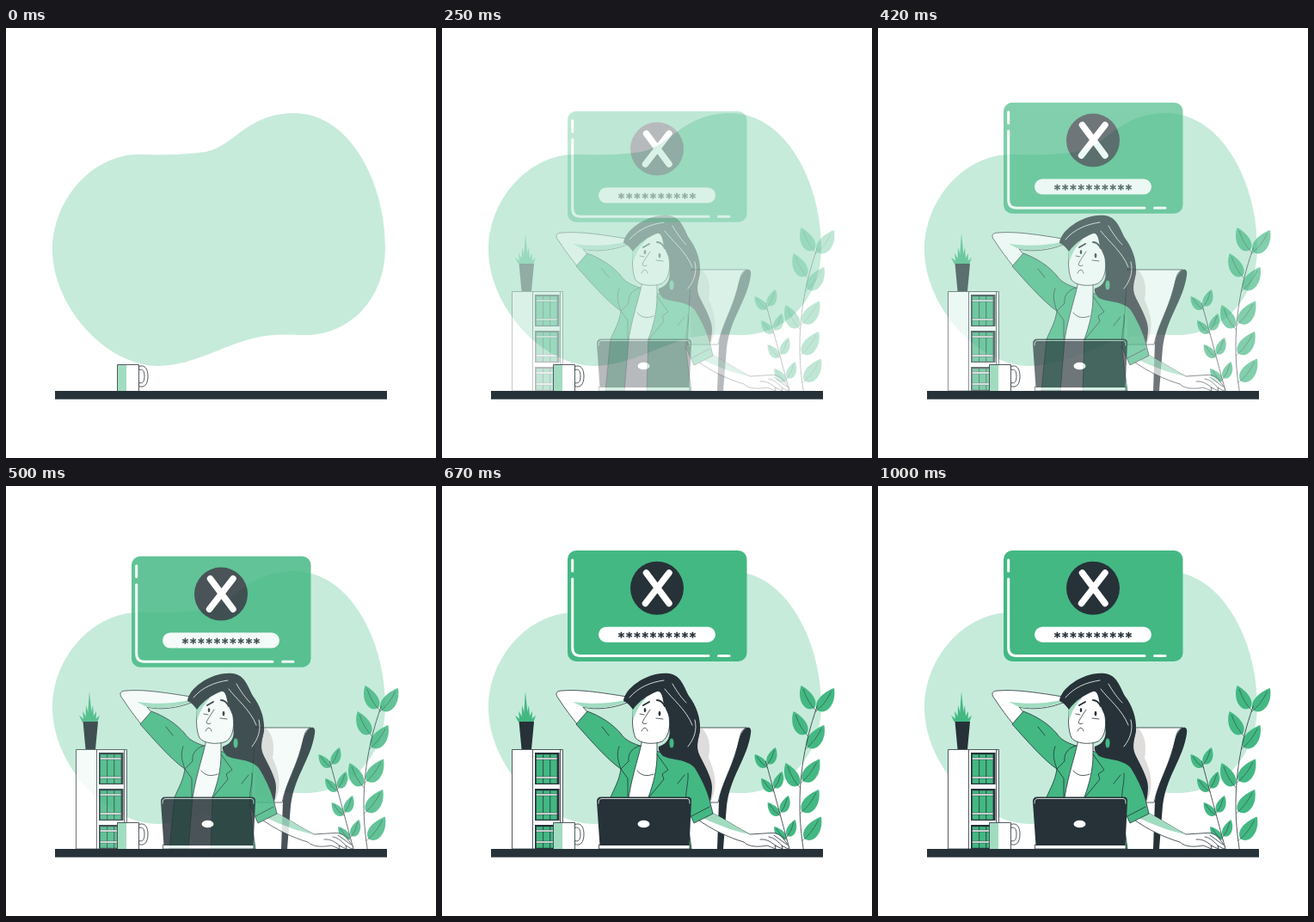
Animation, 500 px wide and 500 px high, one loop 1040 ms. Source, as an HTML page:

```html
<!DOCTYPE html>
<html lang="en">
<head>
<meta charset="utf-8">
<title>Wrong password</title>
<style>
  html, body { margin: 0; width: 100%; height: 100%; overflow: hidden; background: #fff; }
  svg { display: block; width: 100vw; height: 100vh; }
  .dark { fill: #263238; }
  .green { fill: #43b883; }
  .pale { fill: #a1dcc1; }
  .white { fill: #fff; }
  .out { stroke: #263238; stroke-width: .8; stroke-linejoin: round; }
  .line { fill: none; stroke: #263238; stroke-width: .8; stroke-linecap: round; stroke-linejoin: round; }
  .brow { stroke-width: 2; }
  .thin { stroke-width: .5; }
  .shine { fill: none; stroke: #fff; stroke-width: .8; stroke-linecap: round; }
  .stars { font: bold 14px "DejaVu Sans Mono", monospace; letter-spacing: .8px; stroke: #263238; stroke-width: .4; }
</style>
</head>
<body>
<svg viewBox="0 0 500 500">
  <path fill="#c6ebdb" d="M155 147C185 148 212 147 232 144C265 138 280 99 335 99C400 99 441 180 441 255C441 315 400 357 348 357C332 357 320 355 295 359C255 367 220 392 178 393C115 393 54 322 54 258C54 200 100 147 155 147Z"/>

  <g class="fade" id="plants"></g>

  <g class="fade" id="chair">
    <path class="white out" d="M290 281H354C346 284 347 293 343 305C336 330 326 345 321 368H285Z"/>
    <path fill="#dedddb" d="M288 282H303C312 292 312 305 310 316C316 330 322 345 313 367H290Z"/>
    <path class="dark" d="M354 281C358 280 360 282 359 288C357 302 351 315 345 328C337 345 333 356 331 372L327 422H320L322 366C324 350 335 331 341 312C345 300 345 287 354 281Z"/>
  </g>

  <g class="fade" id="woman">
    <!-- raised arm -->
    <path class="white out" d="M215 245C190 241 160 236 140 238C132 238 131 242 136 248C143 259 150 268 158 278L170 264L164 257C180 261 200 258 215 252Z"/>
    <path class="pale" d="M213 249V252C198 257 180 260 164 257L152 251C175 254 195 253 213 249Z"/>
    <!-- resting arm -->
    <path class="white out" d="M295 386C314 400 334 409 351 414C357 420 368 420 378 418L388 422L387 418L396 422L395 418L402 422C405 421 404 419 396 409C392 405 388 403 382 403.500L358 405C344 398 330 388 314 380Z"/>
    <path class="pale" d="M305 384L314 380C330 388 344 398 358 405C345 403 325 396 305 387Z"/>
    <path class="line" d="M370 411C378 410 384 415 389 419M380 408C387 409 391 414 396 419M386 406L401 417"/>
    <!-- jacket and shirt -->
    <path class="green out" d="M169 262L156 277C173 296 193 319 208 329C206 343 200 352 196 362L190 422H290L283 370L293 392L315 381C310 360 304 336 296 322C288 316 270 314 252 309L230 302C218 298 212 294 208 288C198 276 183 267 169 262Z"/>
    <path class="white out" d="M233 294C230 312 222 332 217 362L212 422H238L240 362C246 345 250 330 250 312V294Z"/>
    <path class="line" d="M227 331C232 337 238 338 246 335"/>
    <path class="line" d="M230 302C220 305 216 312 217 320L208 329L216 340V362M250 312L263 330L256 335L258 341L239 364M208 329C204 318 203 311 206 303M282 336L274 346M286 334C287 346 282 356 284 372M290 384L311 373M186 280L194 290"/>
    <!-- head -->
    <path class="dark" d="M255 240C278 245 300 262 300 282C299 295 294 302 300 314C306 326 314 340 314 350C314 356 313 362 312 367C307 352 301 339 294 328C285 317 266 319 257 314C253 310 251 306 252 303C264 299 266 290 264 280Z"/>
    <path class="white out" d="M224 250C220 268 221 284 225 293C231 300 246 301 256 297C263 292 266 282 264 268L258 238H230Z"/>
    <path class="pale" d="M225 249C221 257 221 266 222 273C226 262 228 256 238 246Z"/>
    <path class="dark" d="M211 250C212 235 240 215 264 218C278 220 281 233 287 244C296 256 301 270 300 285C298 298 290 308 280 312C268 309 270 300 269 290C270 272 259 262 257 249C256 243 254 238 250 239C240 243 230 249 222 260C219 256 216 252 211 250Z"/>
    <path class="shine" d="M218 246C228 234 243 228 258 226M268 230C273 239 279 247 284 252M259 236C268 248 284 260 291 278M294 272C297 284 293 294 286 303"/>
    <path class="line brow" d="M234 255L241 251M250 249C254 249 257 252 259 256"/>
    <path class="line" d="M242 260C238 266 234 272 233 275C234 277 236 277 238 276M232 285C234 280 238 280 239 285M230 265L235 266M249 270L257 271"/>
    <ellipse class="dark" cx="236" cy="260.500" rx="1.300" ry="2.600"/>
    <ellipse class="dark" cx="253" cy="264.500" rx="1.400" ry="2.800"/>
    <ellipse class="green out" cx="267" cy="299" rx="3" ry="6"/>
  </g>

  <g class="fade" id="shelf">
    <path class="white out" d="M81.500 306.500H140.500V422H81.500Z"/>
    <path class="line" d="M105.500 307V422M137.500 307V422"/>
  </g>

  <g class="fade" id="pot">
    <path class="dark" d="M89.500 274H107L104 306H92.500Z"/>
  </g>

  <g class="fade" id="laptop">
    <path class="white out" d="M182.500 417H288V422H182.500Z"/>
    <path class="dark" d="M185 361.500H286Q290.500 361.500 290 367L287.500 418H183.500L180 367Q180 361.500 185 361.500Z"/>
    <path class="shine" d="M182 369Q181.500 363.500 186 363.500H285Q288.500 363.500 288 369"/>
    <ellipse class="white" cx="234.500" cy="393" rx="7" ry="4.300"/>
  </g>

  <g class="fade" id="card">
    <rect class="green" x="146" width="208.500" height="129" rx="10"/>
    <path class="shine" style="stroke-width:3" d="M151.700 11V24M151.700 33V113Q151.700 122.500 161 122.500H310M321.500 122.500H334"/>
    <circle class="dark" cx="250" cy="43.800" r="31"/>
    <path class="shine" style="stroke-width:7.500" d="M237.500 26L264 61.500M264 26L236.500 61.500"/>
    <rect class="white" x="182" y="88.800" width="136" height="18" rx="9"/>
    <text class="stars dark" x="204.300" y="105">**********</text>
  </g>

  <g id="mug">
    <path class="white out" d="M154.500 393.500C162 391 165 397 165 405C165 414 161 419 154.500 416.500V412.500C159 414 161 411 161 405C161 399 159 396 154.500 397.500Z"/>
    <rect class="white out" x="129.500" y="391.500" width="25" height="31"/>
    <rect class="pale" x="130" y="392" width="10" height="30"/>
  </g>
  <rect class="dark" x="57" y="422" width="386" height="9.700"/>
</svg>
<script>
const $ = id => document.getElementById(id);
const range = (n, f) => Array.from({ length: n }, (_, i) => f(i));

// A leaf reaching (dx, dy) from its base; its outer, lower edge is the fuller one.
function leaf(x, y, dx, dy) {
  const side = Math.sign(dx);
  const at = (u, v) => `${x + dx * u - side * dy * v} ${y + dy * u + side * dx * v}`;
  return `<path class="green" d="M${at(.1, 0)}C${at(.1, .36)} ${at(.65, .4)} ${at(1, 0)}C${at(.75, -.16)} ${at(.25, -.3)} ${at(.1, 0)}Z"/>
    <path class="line thin" d="M${x} ${y}Q${at(.4, .1)} ${at(.85, 0)}"/>`;
}

// A stem following x = bend(y), with leaves at the given heights on each side.
function plant(bend, top, right, left) {
  const stem = range(20, i => top + (422 - top) * i / 19).map(y => `${bend(y)} ${y}`).join('L');
  const grow = ({ count, height, dx, dy }) => range(count, i => leaf(bend(height(i)), height(i), dx, dy)).join('');
  return grow(right) + grow(left) + `<path class="line" d="M${stem}"/>`;
}

$('plants').innerHTML =
  plant(y => 416 + (y - 370) ** 2 / 640, 256,
    { count: 5, height: i => 263 + 45 * i - 1.9 * i * i, dx: 22, dy: -28 },
    { count: 3, height: i => 261 + 15 * i * (i + 1), dx: -17, dy: -29 }) +
  plant(y => 377 + .27 * (y - 322), 320,
    { count: 4, height: i => 325 + 28 * i, dx: 10, dy: -21 },
    { count: 4, height: i => 328 + 28 * i, dx: -15, dy: -16 });

// Spiky leaves, tallest in the middle.
$('pot').innerHTML += range(7, i => {
  const s = i - 3, x = 97.5 + 2 * s;
  return `<path class="green" d="M${x - 3} 274L${97 + 4 * s} ${239 + 16 * Math.sqrt(Math.abs(s))}L${x + 3} 274Z"/>`;
}).join('');

// Three rows of bound volumes.
$('shelf').innerHTML += range(3, row => {
  const y = 310 + 42 * row, h = Math.min(37, 422 - y);
  const spines = range(3, i =>
    `<rect class="green out thin" x="${109.5 + 8.2 * i}" y="${y + 2}" width="8" height="${h - 3}"/>`);
  const bands = [6, h - 9].map(d =>
    `<rect class="white out thin" x="109.5" y="${y + d}" width="24.4" height="2"/>`);
  return `<rect class="dark" x="108" y="${y}" width="28.5" height="${h}"/>` + spines.join('') + bands.join('');
}).join('');

const loop = 1040, steps = 25;
const faders = document.querySelectorAll('.fade');

// Fade in and rise, then float gently up and back.
function draw(now) {
  const k = Math.floor((now % loop + 4) * steps / loop) % steps;
  const shown = Math.min(1, Math.max(0, (k - 2) / 12));
  const lift = k > 14 ? 3.7 * Math.sin(Math.PI * (k - 14) / 12) : 0;
  faders.forEach(f => f.style.opacity = shown);
  $('card').setAttribute('transform', `translate(0 ${76.8 + 30 * (1 - shown) - lift})`);
}

let start;
function tick(now) {
  start ??= now;
  draw(now - start);
  requestAnimationFrame(tick);
}
draw(0);
requestAnimationFrame(tick);
</script>
</body>
</html>
```
